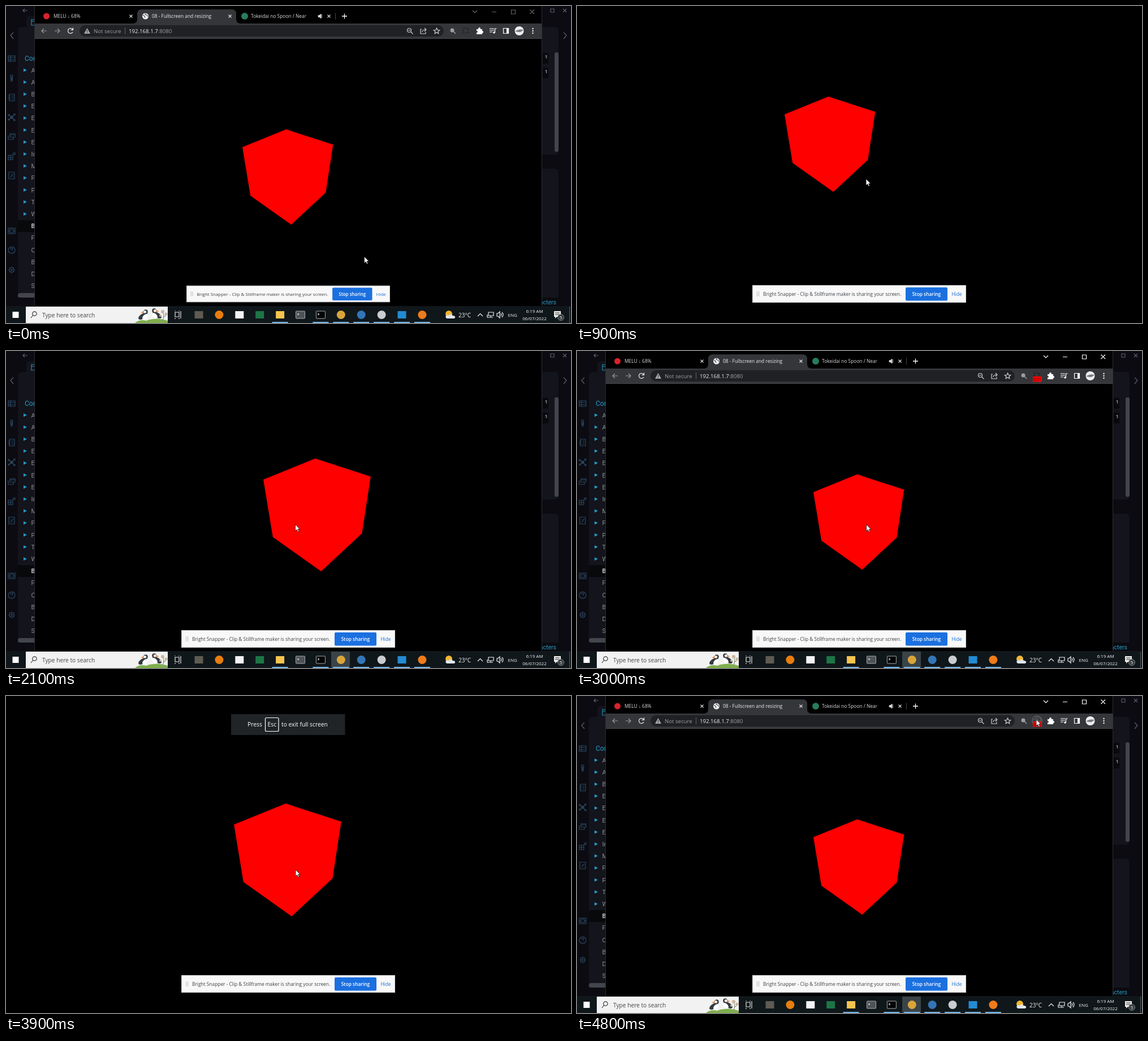
These frames come from a looping animation (999 by 561 pixels, 5 s). An HTML page:

```html
<!DOCTYPE html>
<html lang="en">
<head>
<meta charset="utf-8">
<title>Fullscreen and resizing</title>
<style>
html, body { margin: 0; width: 100%; height: 100%; overflow: hidden; background: #000; }
svg { display: block; width: 999px; height: 561px; font-family: "Open Sans", "Noto Sans", sans-serif; }
.line { fill: none; stroke-width: 1.2; }
.mid { text-anchor: middle; }
.end { text-anchor: end; }
.tab { font-size: 8.4px; }
.url { font-size: 9.65px; }
.small { font-size: 8px; }
</style>
</head>
<body>
<svg viewBox="0 0 999 561">
  <defs>
    <linearGradient id="fade" gradientUnits="userSpaceOnUse" x1="526" x2="546" y1="0" y2="0">
      <stop stop-color="#d8dadd"/><stop offset="1" stop-color="#d8dadd" stop-opacity="0"/>
    </linearGradient>
    <clipPath id="searchClip"><rect x="35" y="532" width="251" height="29"/></clipPath>
  </defs>

  <g id="notes">
    <rect width="999" height="561" fill="#0b0b11"/>
    <path d="M36 37V24q0-6 6-6h20v19zM21 45q0-8 8-8h40v479H21z" fill="#13141c"/>
    <path d="M940 37h30q7 0 7 7v212q0 7-7 7h-30zM940 288h30q7 0 7 7v221h-37z" fill="#13141c"/>
    <rect x="21" y="379" width="40" height="21" fill="#08090b"/>
    <path d="M25 508h30v8H25q-4 0-4-4t4-4z" fill="#43454c"/>
    <rect x="970" y="82" width="7" height="176" rx="3" fill="#43454c"/>
    <path d="M949 83h10v19h-10zM949 109h10v19h-10z" fill="#090a0d"/>
    <g font-size="9" font-weight="700" fill="#85878e" class="mid"><text x="955" y="93">1</text><text x="955" y="119">1</text></g>
    <g class="line" stroke="#5c606b">
      <path d="M38 8h-8m3-3-3 3 3 3M13 47l-5 5 5 6M986 47l5 5-5 6M963 5h6v6h-6zM985 5l6 6m0-6-6 6"/>
    </g>
    <path class="line" stroke="#238cae" d="M51 24h-6v10h6M45 27h6"/>
    <text x="33" y="97" font-size="12" fill="#249cc4" font-family="Roboto, sans-serif">Contents</text>
    <text x="973" y="527.5" font-size="10.5" fill="#249cc4" class="end" font-family="Roboto, sans-serif">Characters</text>
    <g id="index" font-size="11" fill="#90939b" font-family="Roboto, sans-serif"></g>
    <g id="rail" class="line" stroke="#2c4963"></g>
  </g>

  <g id="taskbar">
    <rect y="531" width="999" height="30" fill="#10171b"/>
    <rect x="11.5" y="541" width="11" height="11" fill="#fff"/>
    <rect x="35" y="532" width="251" height="29" fill="#f2f2f2"/>
    <g class="line" stroke="#333"><circle cx="50.5" cy="544.5" r="3.7"/><path d="m48 547-4 5"/></g>
    <text x="64" y="550.5" font-size="10.2" fill="#454545">Type here to search</text>
    <g clip-path="url(#searchClip)">
      <path d="M228 561q8-7 20-4 18-7 38 0v4z" fill="#7fae4d"/>
      <g id="bird"><ellipse cx="242" cy="549" rx="9" ry="4.5" transform="rotate(-32 242 549)" fill="#343a40"/>
        <ellipse cx="246" cy="550" rx="6" ry="3.5" transform="rotate(-45 246 550)" fill="#fff"/>
        <circle cx="247" cy="541" r="3.8" fill="#343a40"/><circle cx="245.7" cy="541.3" r="2.4" fill="#fff"/>
        <path d="m243.5 540-5 2.5 5 1.5z" fill="#e4803a"/></g>
      <use href="#bird" transform="translate(509 -2) scale(-1 1)"/>
      <path d="M276 559q4-8 2-18m0 10q4-2 6-6" class="line" stroke="#8c9a84"/>
      <g fill="#c9b6a0"><circle cx="277" cy="541" r="3"/><circle cx="283" cy="545" r="2.5"/><circle cx="273" cy="548" r="2"/></g>
    </g>
    <path class="line" stroke="#e6e6e6" d="M299 542h7v8h-7zM299 540v-1m7 1v-1m-7 13v2m7-2v2M309 540v13"/>
    <rect id="active" x="575" y="532" width="33" height="29" fill="#3a4448"/>
    <g id="apps"></g>
    <circle cx="783" cy="545" r="6" fill="#f2b632"/>
    <path d="M780 553q-4-1-2-5 3-2 5 0 3-5 7 0 5 0 4 4l-2 1z" fill="#dfe6ee"/>
    <g fill="#f4f4f4">
      <text x="800" y="550.5" font-size="10">23°C</text>
      <text x="887.5" y="549.5" class="small">ENG</text>
      <text x="934.5" y="542.5" class="small mid">6:19 AM</text>
      <text x="934.5" y="555.5" class="small mid">06/07/2022</text>
    </g>
    <g class="line" stroke="#eee" stroke-width="1">
      <path d="m834 549 4.5-4.5 4.500 4.500M853 542h9v6h-9zM857 548v3m-3 0h7M851 546v5h3M868 544h2l3-3v11l-3-3h-2zM875 544q2 2 0 5M877 542q4 4 0 9"/>
    </g>
    <path d="M969 540h12v10h-7l-3 3v-3h-2z" fill="#eee"/>
    <path d="M971 543h8m-8 3h8" stroke="#222"/>
    <circle cx="981" cy="551" r="5.5" fill="#343b3f" stroke="#aaa" stroke-width=".7"/>
    <text x="981" y="554" class="small mid" fill="#fff">5</text>
    <path d="M996.5 532v29" stroke="#555d60"/>
  </g>

  <rect id="page" fill="#000"/>

  <g id="browser">
    <path d="M51 31h173q8 0 8-8v-9q0-8 8-8h159q8 0 8 8v9q0 8 8 8h532v27H51z" fill="#35363a"/>
    <path d="M51 57.5h896" stroke="#4b4c50"/>
    <rect x="130" y="34" width="644" height="20" rx="10" fill="#202124"/>
    <circle cx="71.5" cy="18" r="5.5" fill="#d8232b"/>
    <circle cx="422" cy="18" r="6" fill="#277d5b"/>
    <circle cx="246.5" cy="18" r="5.5" fill="#f1f3f4"/>
    <path d="m242 16 3 2 1 3m1-8-1 2 3 1 2 3" class="line" stroke="#44464a"/>
    <g class="tab" fill="#d8dadd">
      <text x="84" y="21">MELU ↓ 68%</text>
      <text x="258" y="21" fill="#eceef0">08 - Fullscreen and resizing</text>
      <text x="433" y="21" fill="url(#fade)">Tokeidai no Spoon / Near</text>
    </g>
    <g id="closes" class="line" stroke="#dadce0"></g>
    <path d="M582.5 12v12" stroke="#44464a"/>
    <path d="M598.5 13.5v9m-4.5-4.5h9" stroke="#fff" stroke-width="1.3"/>
    <path d="M552 16.5h2l3-2.5v8l-3-2.5h-2zM558.500 15v6" fill="#ddd" stroke="#ddd" stroke-width=".7"/>
    <g id="controls" class="line"><path d="m825 8 4 4 4-4M859 10.5h8M893.500 7h7v7h-7zM926.500 6.500l7.500 7.500m0-7.500-7.500 7.500"/></g>
    <g class="line" stroke="#96999d"><path d="M72 44h-9m4-4-4 4 4 4M86 44h9m-4-4 4 4-4 4"/></g>
    <path class="line" stroke="#f1f3f4" stroke-width="1.5" d="M118 42a4.500 4.500 0 1 0 0 4M118.500 38.500v4h-4"/>
    <path d="m143.500 39 5.500 10h-11z" fill="#a3a7ab"/><path d="M143.500 42.500v3m0 1v1.200" stroke="#202124"/>
    <g class="url"><text x="155" y="47.5" fill="#9aa0a6">Not secure</text>
      <text x="217" y="47.5" fill="#eceef0">192.168.1.7<tspan fill="#9aa0a6">:8080</tspan></text></g>
    <path d="M210.5 38v12" stroke="#5f6368"/>
    <g class="line" stroke="#cdd0d3">
      <circle cx="713" cy="43" r="3.5"/><path d="m716 46 3.500 3.500M711 43h4"/>
      <path d="M735 41h-2v8h9v-3M736 46q0-4 6-4m-2-3 3 3-3 3"/>
      <path d="m761.500 39 1.500 3.500 3.700.3-2.800 2.400.9 3.600-3.300-2-3.300 2 .9-3.600-2.800-2.400 3.700-.3z"/>
    </g>
    <circle cx="789" cy="43" r="3.5" fill="#9b9ea2"/><path d="m791 45 4 4" stroke="#9b9ea2" stroke-width="1.5"/>
    <circle id="hover" cx="813.5" cy="44" r="10" fill="#505155"/>
    <rect x="808.5" y="39" width="9" height="9" class="line" stroke="#151618" stroke-dasharray="3 2"/>
    <g id="badge"><rect x="806" y="45" width="16" height="9.5" rx="1" fill="#f00"/><text x="814" y="52.7" class="mid" font-size="7" fill="#300">0:01</text></g>
    <path d="M832 41h3q0-3 2-3t2 3h3v3q2 0 2 2t-2 2v2h-10v-3q2 0 2-1.500t-2-1.500z" fill="#fff"/>
    <path class="line" stroke="#fff" d="M855 40h8m-8 3h8m-8 3h5M864.500 47v-7h3"/><circle cx="863" cy="47" r="1.8" fill="#fff"/>
    <path d="M879.500 39.500h9v9h-9z" class="line" stroke="#fff"/><path d="M885 39h4v10h-4z" fill="#fff"/>
    <circle cx="907.5" cy="44" r="8" fill="#eceeef"/><path d="M900 45q6-5 15-3-4 5-9 4z" fill="#777b80"/>
    <g fill="#fff"><circle cx="931.5" cy="40" r="1.2"/><circle cx="931.5" cy="44" r="1.2"/><circle cx="931.5" cy="48" r="1.2"/></g>
  </g>
  <path id="edges" d="M50.5 0v531M947.500 0v531" stroke="#2d2e31"/>

  <polygon id="cube" points="495.5,218.3 578.3,245.3 565.3,330.3 504.3,387 432.2,335.7 418,249.700" fill="#f00"/>

  <g id="notice" font-size="10.3" fill="#fff">
    <rect x="398" y="32" width="201.5" height="37" fill="#202427"/>
    <text x="427" y="54">Press</text>
    <rect x="458.5" y="38.5" width="23.5" height="24" rx="2" class="line" stroke="#fff" stroke-width="1"/>
    <text x="470.3" y="54" class="mid">Esc</text>
    <text x="487" y="54">to exit full screen</text>
  </g>

  <g id="share" font-size="8.37">
    <rect x="310.5" y="494.5" width="377" height="30" fill="#f8f8f9" stroke="#cfd1d4"/>
    <path d="M318.500 505v9m3-9v9" stroke="#b9bbbe"/>
    <text x="329" y="512.7" fill="#3c4043">Bright Snapper - Clip &amp; Stillframe maker is sharing your screen.</text>
    <rect x="581" y="498" width="74" height="23.5" rx="2" fill="#1b70e0"/>
    <text x="618" y="512.7" class="mid" font-weight="600" fill="#fff">Stop sharing</text>
    <text x="671.5" y="512.7" class="mid" fill="#1b70d0">Hide</text>
  </g>

  <path id="cursor" d="M0 0V11.500L2.700 9 4.400 13 6.400 12.200 4.700 8.300H8.200Z" fill="#fff" stroke="#111" stroke-width=".8"/>
</svg>
<script>
const $ = id => document.getElementById(id);
const fill = (id, parts) => { $(id).innerHTML = parts.join(''); };

fill('index', [...'AABEEEEIMPPTWBFOBDS'].map((letter, i) => {
  const y = 113.5 + i * 21.2;
  const arrow = i < 13 ? `<path d="M31 ${y - 3}l6 3-6 3z" fill="#2199c8"/>` : '';
  const weight = i === 13 ? 'font-weight="700" fill="#c4c6cc"' : '';
  return `${arrow}<text x="44.5" y="${y + 4}" ${weight}>${letter}${i === 7 ? 'n' : ''}</text>`;
}));

const railIcons = [
  [93, 'M-6-5H6V5H-6zM-6-2H6M-6 2H6M-2-5V5'],
  [128, 'M-2-5q2-2 4 0L1 5h-2zM0-3v6'],
  [162, 'M-4-6H5V6H-4zM-6-3h4m-4 3h4m-4 3h4M0-3h3M0 0h3M0 3h3'],
  [197, 'M-5-4 0 0 5-5M0 0l5 5M0 0l-5 4M-2-2h4v4h-4zM-6-5h2v2h-2zM4-6h2v2H4zM4 4h2v2H4zM-6 3h2v2h-2z'],
  [231, 'M-3-5H6V1H-3zM-6-2V5H3V1M-3-3h9'],
  [266, 'M-6-2H2V6h-8zM-6 2h8M-2-2v8M3-6h3v3H3z'],
  [300, 'M-5-6H5V6H-5zM-2 3 3-3M-2-2h1M2 3h1'],
  [398, 'M-6-5H6V5H-6zM-3-3h6v6h-6zM-6 0h3M3 0h3'],
  [432, 'M-6 0a6 6 0 1 0 12 0a6 6 0 1 0-12 0M-2-1q0-3 2-3t2 2L0 1M0 3v1'],
  [467, 'M-4 0a4 4 0 1 0 8 0a4 4 0 1 0-8 0M0-6v2M0 4v2M-6 0h2M4 0h2M-4-4l1 1M3 3l1 1M-4 4l1-1M3-3l1-1M-1-1h2v2h-2z']
];
fill('rail', railIcons.map(([y, d]) => `<path transform="translate(10 ${y})" d="${d}"/>`));

fill('closes', [221, 396, 571].map(x => `<path d="M${x - 2.5} 15.5l5 5m0-5-5 5"/>`));

// Colour, shape, running
const apps = [
  ['#5f5b52', 'square'], ['#e87d0d', 'circle'], ['#f3f3f3', 'square'], ['#1d7545', 'square'],
  ['#f4c44e', 'square', 1], ['#4d5357', 'window'], ['#050505', 'window', 1], ['#d9a53a', 'circle', 1],
  ['#3475b7', 'circle', 1], ['#c9cdd0', 'circle', 1], ['#238bd3', 'square', 1], ['#ef7b1a', 'circle', 1]
];
const appShapes = {
  circle: (x, color) => `<circle cx="${x}" cy="546.5" r="7.5" fill="${color}"/>`,
  square: (x, color) => `<rect x="${x - 7.5}" y="540" width="15" height="13" fill="${color}"/>`,
  window: (x, color) => `<rect x="${x - 8}" y="540" width="16" height="13" rx="1" fill="${color}" stroke="#a5a9ac"/>
    <path d="M${x - 5} 544l2 1.5-2 1.5" class="line" stroke="#ddd"/>`
};
fill('apps', apps.map(([color, shape, running], i) => {
  const x = 341 + i * 35.9;
  const bar = running ? `<rect x="${x - 14}" y="559" width="28" height="2" fill="#76b9ed"/>` : '';
  return appShapes[shape](x, color) + bar;
}));

const LOOP = 5000, STEP = 100;

const modes = [
  [0, 'window'], [900, 'entering'], [1000, 'full'], [2100, 'leaving'], [2200, 'window'],
  [3200, 'entering'], [3300, 'full'], [4200, 'leaving'], [4300, 'window']
];
const pages = {
  window: [51, 0, 896, 531], entering: [0, 0, 999, 561],
  full: [0, 0, 999, 561], leaving: [51, 0, 896, 531]
};
const enlarged = 'translate(499.5 280.5) scale(1.1835) translate(-499.5 -294.5)';
const cubes = {
  window: '', entering: 'translate(-51 -58)', full: enlarged, leaving: 'translate(52 0) ' + enlarged
};
const cursorPath = [[0, 633.5, 443.5], [700, 511, 306], [2100, 511.5, 307], [4300, 512, 307.5], [4800, 812, 41.5]];

const show = (id, on) => $(id).setAttribute('visibility', on ? 'visible' : 'hidden');
const ease = p => p * p * (3 - 2 * p);

function cursorAt(t) {
  const next = cursorPath.findIndex(k => k[0] > t);
  if (next < 0) return cursorPath.at(-1).slice(1);
  const [t0, x0, y0] = cursorPath[next - 1], [t1, x1, y1] = cursorPath[next];
  const p = ease((t - t0) / (t1 - t0));
  return [x0 + (x1 - x0) * p, y0 + (y1 - y0) * p];
}

function draw(t) {
  const [since, mode] = modes.findLast(m => m[0] <= t);
  const opening = t < 100;
  const [x, y, width, height] = pages[mode];
  for (const [name, value] of Object.entries({ x, y, width, height })) $('page').setAttribute(name, value);
  show('browser', mode === 'window');
  show('edges', mode === 'window' || mode === 'leaving');
  $('cube').setAttribute('transform', cubes[mode]);
  $('notice').setAttribute('opacity', mode === 'full' ? Math.min(1, (t - since) / 300) : 0);
  show('active', !opening);
  $('controls').setAttribute('stroke', opening ? '#65676a' : '#fff');
  $('share').setAttribute('transform', opening ? 'translate(499 509.5) scale(.952) translate(-499 -509.5)' : '');
  $('badge').setAttribute('opacity', t >= 3000 ? 1 : 0);
  $('hover').setAttribute('opacity', t >= 4700 ? 1 : 0);
  $('cursor').setAttribute('transform', `translate(${cursorAt(t)})`);
}

const start = performance.now();
function tick() {
  const t = (performance.now() - start) % LOOP;
  draw(Math.floor(t / STEP) * STEP);
  requestAnimationFrame(tick);
}
tick();
</script>
</body>
</html>
```
